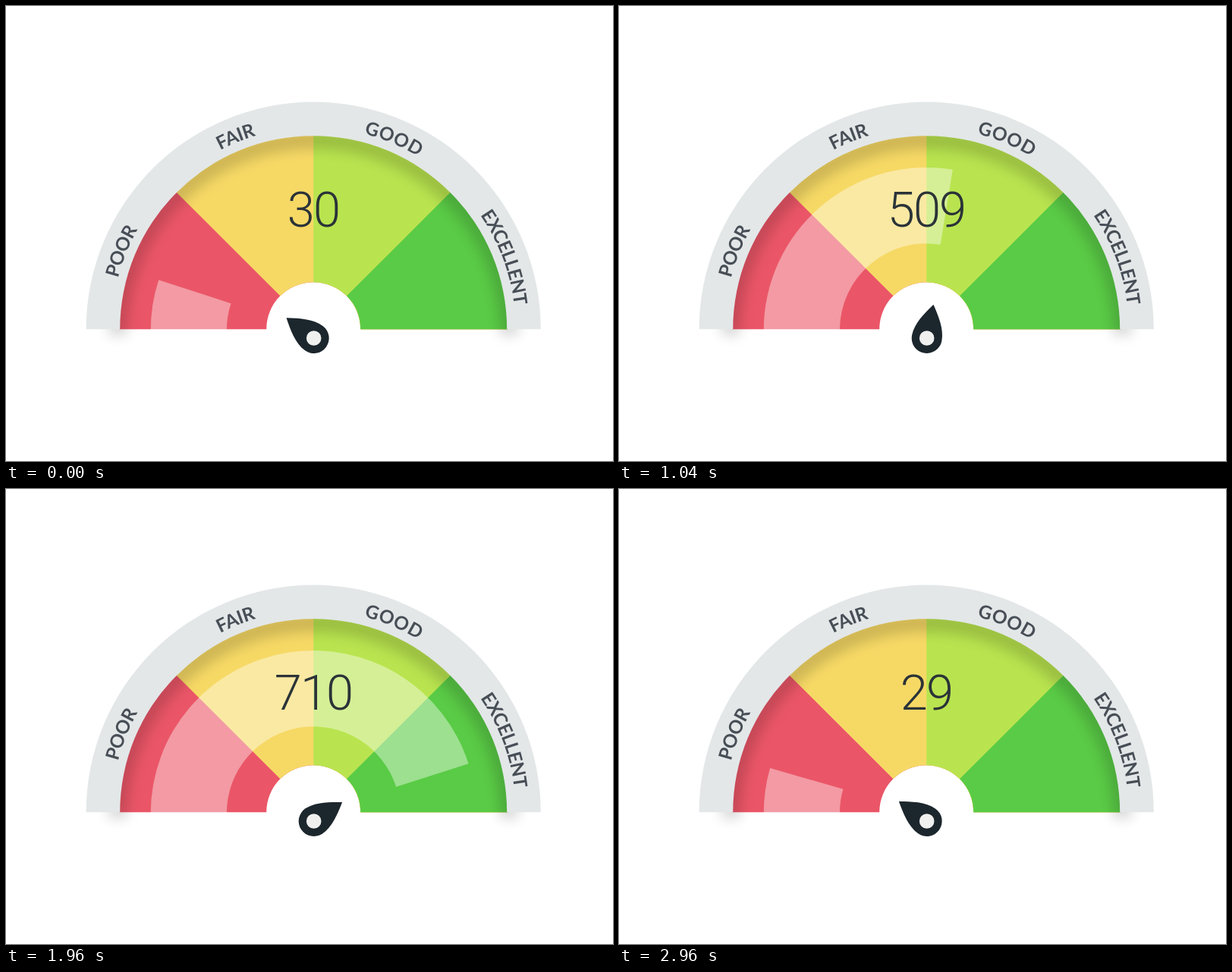
Animation, 800 px wide and 600 px high, one loop 3 s. Source, as an HTML page:

```html
<!DOCTYPE html>
<html lang="en">
<head>
<meta charset="utf-8">
<title>Score gauge</title>
<style>
  html, body { margin: 0; width: 100%; height: 100%; overflow: hidden; background: #fff; }
  svg { display: block; width: 800px; height: 600px; }
  text { text-anchor: middle; }
  .label { font: 700 24.5px Lato, "Open Sans", sans-serif; fill: #474e56; }
  #score { font: 300 65px Roboto, "Open Sans", sans-serif; letter-spacing: -1.9px; fill: #2b3338; }
</style>
</head>
<body>
<svg viewBox="0 0 800 600">
  <defs>
    <path id="baseline" d="M138.8 426.3A266.5 266.5 0 0 1 671.8 426.3"/>
    <filter id="blur" x="-20%" y="-20%" width="140%" height="140%"><feGaussianBlur stdDeviation="8.5"/></filter>
  </defs>
  <g id="sectors"></g>
  <path d="M147.3 434A258 258 0 0 1 663.3 434" fill="none" stroke="#000" stroke-width="24" opacity=".17" filter="url(#blur)"/>
  <path id="rim" fill="#e3e7e8"/>
  <g id="labels"></g>
  <path id="band" fill="#fff" fill-opacity=".4"/>
  <text id="score" x="405" y="290.8"></text>
  <g transform="translate(405.7 438)">
    <path id="needle" fill="#1c262d" d="M0-45C9-32 20-16 20 0A20 20 0 0 1-20 0C-20-16-9-32 0-45Z"/>
    <circle r="9.8" fill="#f0f0ef"/>
  </g>
</svg>
<script>
const LOOP = 3000, STEP = 40, CX = 405.2, CY = 426.2;
const MID = 520, PAUSE = 1960, TURN = 2200, END = LOOP - STEP;
const $ = id => document.getElementById(id);

// Angles run clockwise in degrees, from 0 at the left to 180 at the right.
function point(r, deg, cy) {
  const a = deg * Math.PI / 180;
  return (CX - r * Math.cos(a)).toFixed(2) + ' ' + (cy - r * Math.sin(a)).toFixed(2);
}

function ringPart(inner, outer, from, to, cy = CY) {
  return `M${point(outer, from, cy)}A${outer} ${outer} 0 0 1 ${point(outer, to, cy)}` +
    `L${point(inner, to, cy)}A${inner} ${inner} 0 0 0 ${point(inner, from, cy)}Z`;
}

function add(parent, tag, attrs) {
  const el = document.createElementNS('http://www.w3.org/2000/svg', tag);
  for (const name in attrs) el.setAttribute(name, attrs[name]);
  return parent.appendChild(el);
}

// Each sector runs on beneath the next one, so no seams show.
['#ea5667', '#f6d965', '#b9e44f', '#5acb46'].forEach((fill, i) =>
  add($('sectors'), 'path', { fill, d: ringPart(62, 256, i * 45, 180) }));

$('rim').setAttribute('d', ringPart(255, 299.6, 0, 180));

[['POOR', 22.1, -.4], ['FAIR', 67.9, -.5], ['GOOD', 112.9, .6], ['EXCELLENT', 159.3, -.6]]
  .forEach(([word, deg, gap]) => {
    const text = add($('labels'), 'text', { class: 'label', 'letter-spacing': gap });
    add(text, 'textPath', { href: '#baseline', startOffset: deg / 1.8 + '%' }).textContent = word;
  });

// Cubic ease from 0 to 1 with the given speeds at its ends.
function ease(u, first = 0, last = 0) {
  const w = 1 - u;
  return u * u * (3 - 2 * u) + first * u * w * w - last * u * u * w;
}

const mix = (a, b, k) => a + (b - a) * k;

// Rise quickly to mid, glide to top, then fall; a larger lag delays the fall.
const parts = {
  band: { low: 18, mid: 70.1, top: 166.8, end: 16.1, lag: 1.44 },
  needle: { low: 36.5, mid: 80.3, top: 149.5, end: 35.1, lag: 1.72 },
  score: { low: 30, mid: 416, top: 724, end: 29, lag: 2.377 }
};

function valueAt({ low, mid, top, end, lag }, t) {
  if (t < MID) return mix(low, mid, ease(t / MID, .5, .5));
  if (t < TURN) return mix(mid, top, ease((Math.min(t, PAUSE) - MID) / (TURN - MID), .5));
  return mix(top, end, ease(((t - TURN) / (END - TURN)) ** lag));
}

function draw(now) {
  const t = Math.floor(now % LOOP / STEP) * STEP;
  $('band').setAttribute('d', ringPart(114.3, 214.5, 0, valueAt(parts.band, t), 427.5));
  $('needle').setAttribute('transform', `rotate(${(valueAt(parts.needle, t) - 90).toFixed(2)})`);
  $('score').textContent = Math.round(valueAt(parts.score, t));
}

const start = performance.now();
function tick() {
  draw(performance.now() - start);
  requestAnimationFrame(tick);
}
tick();
</script>
</body>
</html>
```
